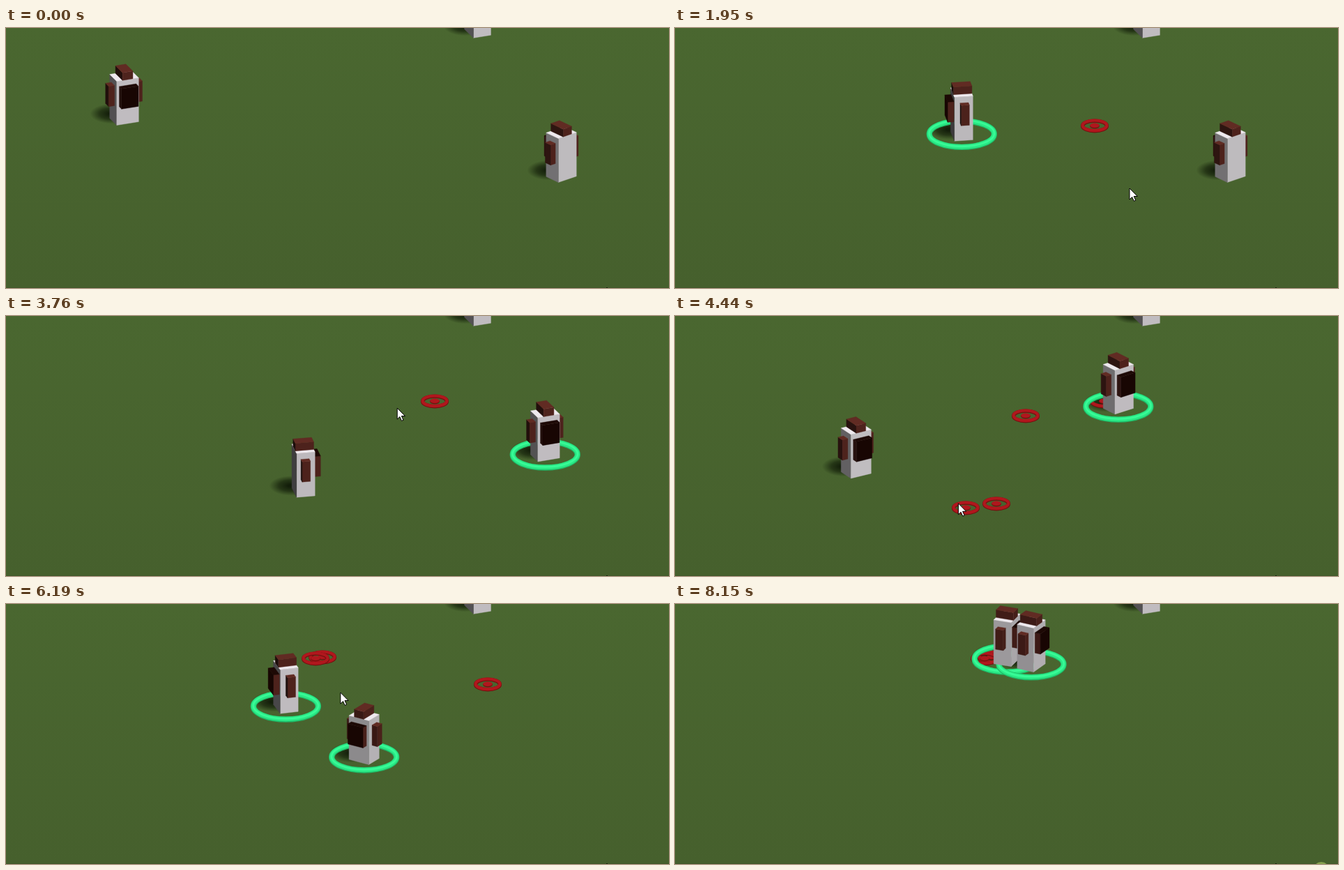
Write an HTML page with a canvas that moves like this. It is 951x373 px and loops after 8.2 s.

```html
<!DOCTYPE html>
<html lang="en">
<head>
<meta charset="utf-8">
<title>Unit selection</title>
<style>
html, body { margin: 0; width: 100%; height: 100%; overflow: hidden; background: #48632e; }
canvas { display: block; }
</style>
</head>
<body>
<canvas id="stage" width="951" height="373"></canvas>
<script>
const ctx = document.getElementById('stage').getContext('2d');
const LOOP = 8200, STEP = 5;
const TILT = 0.4;      // vertical squash of the ground plane
const SPEED = 0.324;   // ground pixels per ms
const REACH = 34;      // a waypoint counts as reached at this distance
const GAP = 50;        // units stop this far from a resting unit
const WHITE = [255, 250, 255], BROWN = [104, 46, 38];

// The player's hand: each key is a plain move, a selection or a move order.
const move = (t, x, y) => ({ t, x, y });
const select = (t, x, y, ...ids) => ({ t, x, y, ids });
const order = (t, x, y) => ({ t, x, y, order: true });
const hand = [
  move(70, 851, 374), select(790, 166, 92, 0), order(1172, 402, 162),
  order(1720, 602, 140), move(1950, 652, 230), order(2060, 613, 251),
  order(2300, 283, 264), order(2500, 167, 164), select(2950, 825, 188, 1),
  order(3648, 615, 122), order(3880, 503, 143), order(4150, 461, 269),
  order(4370, 417, 275), select(4920, 185, 140, 0, 1), order(5492, 691, 115),
  order(5800, 454, 76), order(6000, 444, 78), move(6680, 630, 333),
  move(6850, 795, 347), move(7600, 795, 347), move(8050, 945, 376)
];

const distance = (a, b) => Math.hypot(a.x - b.x, (a.y - b.y) / TILT);

function advance(unit, units) {
  while (unit.queue.length && distance(unit, unit.queue[0]) < REACH) unit.queue.shift();
  const goal = unit.queue[0];
  const blocked = units.some(o => o !== unit && !o.queue.length && distance(unit, o) < GAP);
  if (!goal || blocked) return;
  const angle = Math.atan2((goal.y - unit.y) / TILT, goal.x - unit.x);
  const turn = angle - unit.h;
  unit.h += Math.atan2(Math.sin(turn), Math.cos(turn)) * 0.1;
  unit.x += Math.cos(angle) * SPEED * STEP;
  unit.y += Math.sin(angle) * SPEED * STEP * TILT;
}

// Play the whole game once and keep every state.
function simulate() {
  const unit = (x, y, h) => ({ x, y, h, on: false, queue: [] });
  const units = [unit(169.5, 132, 4.33), unit(796.5, 213, 0.866), unit(676.5, 6, 2.75)];
  const states = [];
  for (let t = 0; t < LOOP; t += STEP) {
    for (const key of hand.filter(k => k.t > t - STEP && k.t <= t)) {
      if (key.ids) units.forEach((u, i) => u.on = key.ids.includes(i));
      if (key.order) units.filter(u => u.on).forEach(u => u.queue.push(key));
    }
    units.forEach(u => advance(u, units));
    states.push({
      units: units.map(u => ({ ...u })).sort((a, b) => a.y - b.y),
      markers: new Set(units.filter(u => u.on).flatMap(u => u.queue))
    });
  }
  return states;
}

function polygon(points, fill, stroke = fill, width = 0.4) {
  ctx.beginPath();
  points.forEach(p => ctx.lineTo(...p));
  ctx.closePath();
  ctx.fillStyle = fill;
  ctx.strokeStyle = stroke;
  ctx.lineWidth = width;
  ctx.fill();
  ctx.stroke();
}

const shade = (color, v) => `rgb(${color.map(c => Math.round(c * v / 255))})`;

// A box centred at (f, s) in the unit's own axes, standing at height z.
function box(u, { f = 0, s = 0, z = 0, size: [length, width, height], color, pack }) {
  const c = Math.cos(u.h), n = Math.sin(u.h);
  const base = [[-1, -1], [1, -1], [1, 1], [-1, 1]]
    .map(([a, b]) => [f + a * length / 2, s + b * width / 2]);
  const corner = ([a, b], up) => [u.x + a * c - b * n, u.y + (a * n + b * c) * TILT - up];
  const top = z + height;
  for (let i = 0; i < 4; i++) {
    const angle = u.h + (i - 1) * Math.PI / 2;
    const nx = Math.cos(angle), nz = Math.sin(angle);
    if (nz <= 0) continue;
    const a = base[i], b = base[(i + 1) % 4];
    const fill = pack && i === 3 ? '#180603' : shade(color, 92 + 47 * nx + 89 * nz);
    polygon([corner(a, z), corner(b, z), corner(b, top), corner(a, top)], fill);
  }
  polygon(base.map(p => corner(p, top)), pack ? '#1d0905' : shade(color, 238));
}

const arm = side => ({ f: 1, s: side * 21.5, z: 25, size: [12, 9, 29], color: BROWN });
const body = { size: [27, 34, 63], color: WHITE };
const pack = { f: -18, z: 26, size: [9, 26, 29], color: BROWN, pack: true };
const cap = { z: 63, size: [27, 16, 11], color: BROWN };

function drawUnit(u) {
  const depth = ({ f = 0, s = 0 }) => f * Math.sin(u.h) + s * Math.cos(u.h);
  const parts = [body, pack, arm(-1), arm(1)].sort((a, b) => depth(a) - depth(b));
  [...parts, cap].forEach(p => box(u, p));
}

function drawShadow({ x, y }) {
  ctx.save();
  ctx.translate(x - 18, y - 9);
  ctx.scale(1, 0.46);
  const g = ctx.createRadialGradient(0, 0, 4, 0, 0, 31);
  g.addColorStop(0, 'rgba(10,18,4,.85)');
  g.addColorStop(0.5, 'rgba(14,24,6,.6)');
  g.addColorStop(1, 'rgba(20,32,10,0)');
  ctx.fillStyle = g;
  ctx.fillRect(-31, -31, 62, 62);
  ctx.restore();
}

function ellipse(x, y, rx, ry, color, width) {
  ctx.beginPath();
  ctx.ellipse(x, y, rx, ry, 0, 0, 2 * Math.PI);
  ctx.lineWidth = width;
  ctx.strokeStyle = ctx.fillStyle = color;
  width ? ctx.stroke() : ctx.fill();
}

function drawRing({ x, y }) {
  y -= 2.5;
  ellipse(x, y, 46.5, 18.7, '#1fba68', 8.4);
  ellipse(x, y - 0.5, 46.5, 18.7, '#2be985', 6.6);
  ellipse(x, y - 1, 46.7, 18.7, '#38fb98', 2.5);
}

function drawMarker({ x, y }) {
  ellipse(x, y + 0.4, 17.4, 7.3, '#74100f', 5.4);
  ellipse(x, y - 0.2, 17.4, 7.3, '#b0171d', 4.2);
  ellipse(x, y + 0.6, 7, 3.8, '#74100f');
  ellipse(x, y - 0.3, 6.7, 3.2, '#b0171d');
}

function drawPointer(t) {
  const i = hand.findIndex(k => k.t > t);
  if (i < 1) return;
  const from = hand[i - 1], to = hand[i];
  const p = (t - from.t) / (to.t - from.t), e = p * p * (3 - 2 * p);
  const x = from.x + (to.x - from.x) * e, y = from.y + (to.y - from.y) * e;
  const arrow = [[0, 0], [0, 16], [3.7, 12.5], [6.3, 18.3], [8.8, 17.2], [6.2, 11.5], [11.3, 11.5]];
  polygon(arrow.map(([a, b]) => [x + a, y + b]), '#fff', '#000', 1);
}

const ground = ctx.createLinearGradient(0, 0, 0, 373);
ground.addColorStop(0, '#4a6730');
ground.addColorStop(1, '#46602d');

function drawGround(t) {
  ctx.fillStyle = ground;
  ctx.fillRect(0, 0, 951, 373);
  ctx.fillStyle = '#3f5629';
  ctx.fillRect(0, 372, 951, 1);
  ctx.fillStyle = '#15200c';
  ctx.fillRect(861, 372, 2, 1);
  if (t > 8100) ellipse(927, 380, 11, 10, '#86a04e');
}

const states = simulate();

function draw(t) {
  const { units, markers } = states[Math.floor(t / STEP)];
  drawGround(t);
  units.forEach(drawShadow);
  markers.forEach(drawMarker);
  units.filter(u => u.on).forEach(drawRing);
  units.forEach(drawUnit);
  drawPointer(t);
}

const start = performance.now();
(function frame() {
  draw((performance.now() - start) % LOOP);
  requestAnimationFrame(frame);
})();
</script>
</body>
</html>
```
